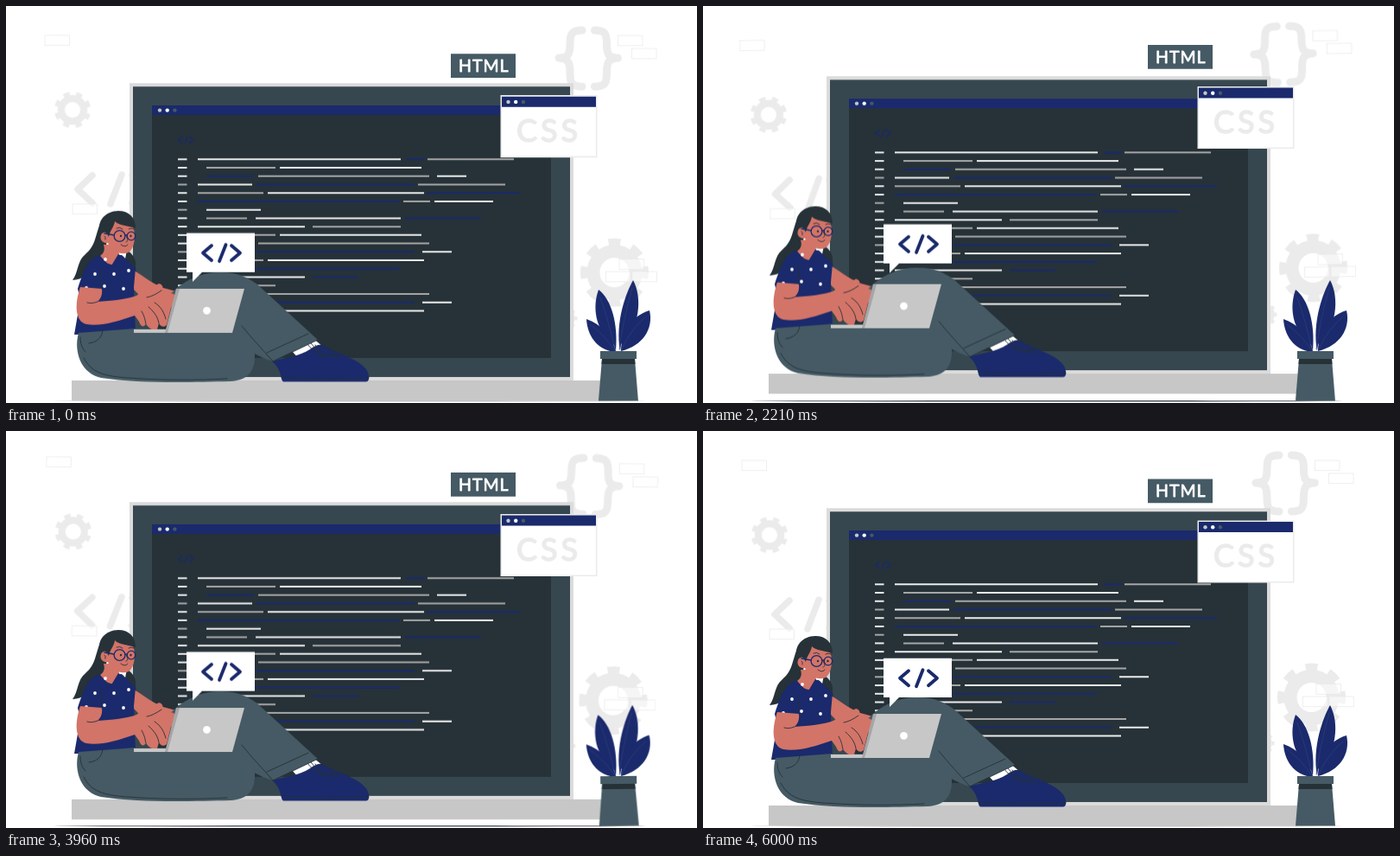
These frames come from a looping animation (800x459 px, 6040 ms). An HTML page:

```html
<!DOCTYPE html>
<html lang="en">
<head>
<meta charset="utf-8">
<title>Coding at a giant screen</title>
<style>
html, body { margin: 0; width: 100%; height: 100%; overflow: hidden; background: #fff; }
svg { display: block; width: 800px; height: 459px; }

.slow, .mid, .fast, .sway, .wind, .floor { animation: 6.04s linear -20ms infinite; }
.slow { animation-name: slow; }
.mid { animation-name: mid; }
.fast { animation-name: fast; }
.floor { animation-name: floor; }
.sway { animation-name: sway; transform-origin: 400px 185px; }
.wind { animation-name: wind; transform-origin: 709px 387px; }

/* Cycles of 6 s, 3 s and 1.5 s with a short rest at the end of the loop */
@keyframes slow {
  0%, 99.338%, 100% { transform: translateY(0); }
  49.669% { transform: translateY(-10.67px); }
}
@keyframes mid {
  0%, 49.669%, 99.338%, 100% { transform: translateY(0); }
  24.834%, 74.503% { transform: translateY(-10.67px); }
}
@keyframes fast {
  0%, 24.834%, 49.669%, 74.503%, 99.338%, 100% { transform: translateY(0); }
  12.417%, 37.252%, 62.086%, 86.921% { transform: translateY(-10.67px); }
}
@keyframes sway {
  0%, 99.338%, 100% { transform: rotate(0deg); }
  12.417%, 62.086% { transform: rotate(1deg); }
  37.252%, 86.921% { transform: rotate(-1deg); }
}
@keyframes wind {
  0%, 99.338%, 100% { transform: rotate(0deg); }
  6.209%, 31.043%, 55.877%, 80.712% { transform: rotate(1deg); }
  18.626%, 43.461%, 68.295%, 93.129% { transform: rotate(-1deg); }
}
@keyframes floor {
  0%, 99.338%, 100% { opacity: .3; }
  49.669% { opacity: 1; }
}

.navy { fill: #1a2a6c; }
.slate { fill: #455a64; }
.dark { fill: #263238; }
.grey { fill: #c7c7c7; }
.skin { fill: #d37468; }
.line { fill: none; stroke: #263238; stroke-width: .9; stroke-linecap: round; stroke-linejoin: round; }
.round { fill: none; stroke-linecap: round; stroke-linejoin: round; }
.box { fill: #fff; fill-opacity: .5; stroke: #e8e8e8; stroke-width: .7; }
.gear { fill: none; stroke: #ebebeb; }
text { font-family: Lato, "Open Sans", sans-serif; stroke-linejoin: round; }
</style>
</head>
<body>
<svg viewBox="0 0 800 459">
  <defs>
    <g id="gear" class="gear">
      <circle r="24.5" stroke-width="15"/>
      <circle r="35" stroke-width="9" pathLength="16" stroke-dasharray="1" stroke-dashoffset=".5"/>
    </g>
    <path id="brace" d="M667 28C655 28 653 32 653 43C653 54 652 60 640 60C652 60 653 67 653 78C653 89 655 93 667 93"/>
    <g id="dots">
      <circle r="2.2" fill="#c7c7c7"/>
      <circle cx="8.7" r="2.2" fill="#fff"/>
      <circle cx="17.4" r="2.2" fill="#455a64"/>
    </g>
    <path id="tag" d="M-12-8.5L-22 0L-12 8.5M4.5-9.5L-3 9.5M11-8.5L21 0L11 8.5"/>
  </defs>

  <g class="sway">
    <use href="#gear" transform="translate(77 120.3) rotate(22.5) scale(.535)"/>
    <use href="#gear" transform="translate(704.5 308)"/>
    <use href="#gear" transform="translate(648 361) scale(.34)"/>
    <g class="round" stroke="#ebebeb" stroke-width="9">
      <use href="#brace"/>
      <use href="#brace" transform="translate(1348.4) scale(-1 1)"/>
    </g>
    <path class="round" stroke="#ebebeb" stroke-width="7.5" d="M100 196L83 212L100 228M134 195L121 229M146 196L165 212L146 228"/>
    <g id="boxes"></g>
  </g>

  <ellipse class="floor dark" cx="398" cy="456.8" rx="343" ry=".8"/>

  <g class="slow">
    <path fill="#dbdbdb" d="M143 89.3H657V433H143Z"/>
    <path fill="#37474f" d="M147 93.3H653V429H147Z"/>
    <path class="dark" d="M169 115H631V407H169Z"/>
    <path class="navy" d="M169 115H631V126H169Z"/>
    <use href="#dots" x="178" y="120.6"/>
    <use href="#tag" class="round" stroke="#1a2a6c" stroke-width="4" transform="translate(208.5 155) scale(.4)"/>
    <g id="code" stroke-width="2"></g>
    <path class="grey" d="M76 433H705V456.3H76Z"/>
  </g>

  <g class="mid">
    <!-- hair -->
    <path class="dark" d="M109 252C103 266 104 277 92 287C82 295 84 308 77 317C88 317 101 308 107 296C112 288 117 280 117 268Z"/>
    <path class="dark" d="M140 282C148 288 151 294 150 301C150 309 155 313 152 319L135 308Z"/>
    <path class="line" d="M104 277C94 290 96 303 84 312"/>
    <!-- far arm -->
    <path class="skin" d="M143 303C155 309 167 320 182 326L197 330L190 345L160 340L145 325Z"/>
    <!-- far leg and shoe -->
    <path fill="#fff" d="M330 398L355 384L367 394L340 409Z"/>
    <path class="navy" d="M308 411C322 407 340 405 352 397C357 393 362 391 367 392C380 402 405 406 416 419C421 425 422 434 417 434.6H321C317 431 320 421 308 411Z"/>
    <path class="line" d="M319 429C350 432 385 431 420 430M349 391C356 401 368 407 385 405M358 392C364 402 375 408 382 401M364 393C372 396 379 402 386 408M353 390L368 407"/>
    <path class="slate" d="M184 342C194 325 218 309 245 308C266 307 279 313 291 322L361 386L309 411C288 405 265 389 252 376Z"/>
    <path class="line" d="M273 370C285 385 296 396 309 411L361 386M302 401L350 379"/>
    <!-- shirt -->
    <path class="navy" d="M108 289C98 291 92 299 83 327L86 340L79 380L150 379L148 325L150 303L134 288Z"/>
    <!-- near leg -->
    <path class="slate" d="M84 378C78 400 87 425 110 430C155 437 215 435 260 434C281 433 289 421 288 402C287 387 277 376 262 374L150 373Z"/>
    <path class="line" d="M90 407C99 424 113 428 140 430C180 433 220 433 256 431M96 390C105 389 111 384 112 375M86 383C86 390 88 396 92 400"/>
    <!-- neck and face -->
    <path class="skin" d="M113 276C115 283 113 286 109 289C114 297 120 300 126 299C129 296 131 292 131 288L130 276Z"/>
    <path class="skin" d="M119 250C130 245 143 248 148 258C150 267 149 280 142 285C133 289 121 283 118 274C112 275 108 270 110 265C111 261 116 261 118 265Z"/>
    <path class="dark" d="M109 265C104 249 115 237 130 237C142 237 150 244 150 257C141 254 131 254 126 249C125 256 120 260 119 267C116 260 110 260 109 265Z"/>
    <g class="round" stroke="#1a2a6c" stroke-width="1.3">
      <circle cx="131.5" cy="266" r="6.4"/>
      <circle cx="145" cy="266" r="4.8"/>
      <path d="M125 265L114 263M138 265L140 265"/>
    </g>
    <circle class="dark" cx="133" cy="266" r="1.2"/>
    <circle class="dark" cx="144.5" cy="266" r="1.2"/>
    <path class="line" d="M128 257Q132 255 135 258M142 258Q145 256 148 258M139 266C141 270 142 272 139 273M133 276Q138 280 141 276M114 266Q116 267 115 270"/>
    <path class="navy" d="M108 288L121 302L111 305L102 292ZM130 287L136 290L131 303L121 302Z"/>
    <g id="spots" fill="#fff"></g>
    <!-- near arm, hands -->
    <path class="skin" d="M86 325L111 327C112 335 109 339 106 342C122 341 140 339 151 335C160 328 169 326 177 321C181 322 183 325 180 329L194 333C198 337 196 343 191 349L186 369C183 372 179 371 177 367L175 374C170 376 166 373 162 368C159 372 156 371 154 365L149 358C129 365 108 371 93 368C80 365 79 345 86 325Z"/>
    <path class="line" d="M106 342C101 344 97 344 94 343M180 329C174 333 169 336 163 337M172 343C180 348 183 355 185 362M165 348C173 355 176 361 177 367M157 353C161 360 161 364 162 368M110 306C111 315 111 321 111 327"/>
    <!-- laptop -->
    <path class="grey" d="M148 374H190V378H148Z"/>
    <path fill="#a6a6a6" d="M197 327H205L192 378H184Z"/>
    <path class="grey" d="M201 327H276L262 378H187Z"/>
    <circle cx="232.5" cy="352.3" r="4.4" fill="#fff"/>
  </g>

  <g class="fast">
    <path fill="#fff" d="M209 262.8H288V308H227L216 319V308H209Z"/>
    <use href="#tag" class="round" stroke="#1a2a6c" stroke-width="3.8" transform="translate(250 285.8)"/>
    <path class="slate" d="M515 55.5H590V83.2H515Z"/>
    <text x="524" y="76.2" font-size="19.5" letter-spacing="1" fill="#fff" stroke="#fff" stroke-width=".8">HTML</text>
    <path fill="#fff" stroke="#ebebeb" stroke-width="1.6" d="M573.3 104.2H683.7V174.7H573.3Z"/>
    <path class="navy" d="M574 105H683V117H574Z"/>
    <use href="#dots" x="581.5" y="111.2"/>
    <text x="591" y="157" font-size="36" letter-spacing="4" fill="#ebebeb" stroke="#ebebeb" stroke-width="1.6">CSS</text>
  </g>

  <g class="wind">
    <g class="navy">
      <path d="M704 400C684 397 673 381 672 362C689 368 701 381 706 399Z"/>
      <path d="M704 392C681 374 679 347 686 328C701 339 709 368 706 399Z"/>
      <path d="M711 399C705 365 718 331 726 317C737 337 734 373 712 391Z"/>
      <path d="M712 399C712 375 727 357 745 352C750 373 737 393 712 399Z"/>
    </g>
    <path class="round" stroke="#31427f" stroke-width=".6" d="M676 368Q695 382 704 398M688 337Q698 365 705 397M725 326Q714 365 710 397M741 359Q722 375 713 397"/>
    <path class="slate" d="M688 399H730V408H688ZM690 408H728L732 456.5H686Z"/>
    <path class="dark" d="M690 408H728L728.5 414H689.5Z"/>
  </g>
</svg>

<script>
const add = (id, tag, attrs) => {
  const el = document.createElementNS("http://www.w3.org/2000/svg", tag);
  for (const key in attrs) el.setAttribute(key, attrs[key]);
  document.getElementById(id).append(el);
};

// One string per code row: shade and x range of each stroke
const rows = [
  "w222-457 n464-485 g488-588", "g232-312 w317-481", "n232-287 g292-490 w499-533",
  "w222-285 n290-473 g477-578", "g222-298 w303-484 n487-595", "n222-456 g460-491 w496-564",
  "w232-295", "g232-279 w289-457 n462-550", "w222-346 g355-457", "g232-312 w317-481",
  "n232-287 g292-490", "n290-473 w482-516", "g222-298 w303-484", "n222-456",
  "w222-346 n355-408", "g232-312", "g292-490", "n290-473 w482-516", "w303-484"
];
const shades = { w: "#ebebeb", g: "#a6a6a6", n: "#1a2a6c" };
rows.forEach((row, i) => {
  const y = 177.3 + 9.73 * i;
  const mark = [3, 6, 11].includes(i) ? "g199-209.5 " : "w199-209.5 ";
  for (const part of (mark + row).split(" ")) {
    const [from, to] = part.slice(1).split("-");
    add("code", "path", { d: `M${from} ${y}H${to}`, stroke: shades[part[0]] });
  }
});

for (const [x, y] of [[45, 34], [708.5, 34], [724.5, 49], [77, 229], [710, 292.5], [694.5, 307], [725, 307]])
  add("boxes", "rect", { class: "box", x, y, width: 28.5, height: 11.8 });

for (const [cx, cy] of [[103, 310], [125, 310], [93, 326], [114, 324], [136, 327], [115, 293], [142, 306]])
  add("spots", "circle", { cx, cy, r: 1.9 });
</script>
</body>
</html>
```
